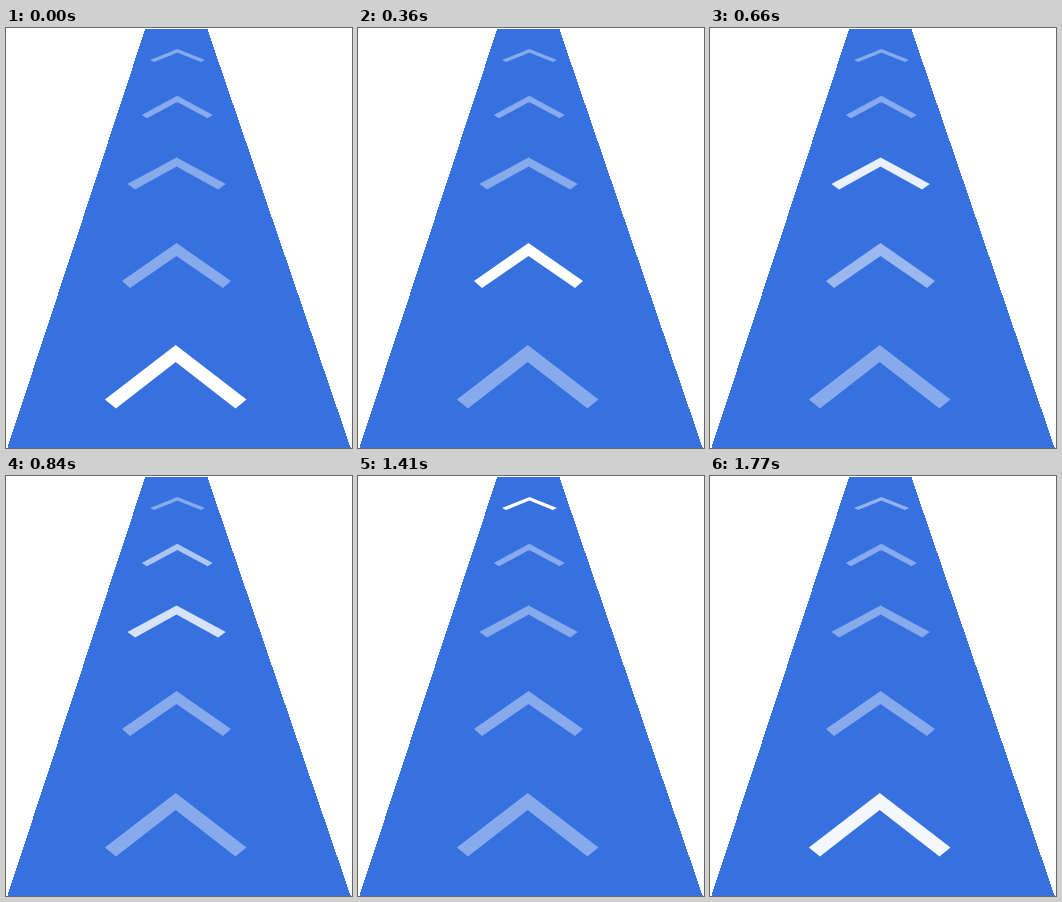
These frames come from a looping animation (346x420 px, 1860 ms). An HTML page with a canvas:

```html
<!DOCTYPE html>
<html lang="en">
<head>
<meta charset="utf-8">
<title>Road arrows</title>
<style>
  html, body { margin: 0; width: 100%; height: 100%; overflow: hidden; background: #fff; }
  canvas { display: block; }
</style>
</head>
<body>
<canvas id="stage" width="346" height="420"></canvas>
<script>
const ctx = document.getElementById('stage').getContext('2d');
const LOOP = 1860;
const DIM = 0.4;

// Each arrow, nearest first: centre, half widths of the tips, and heights.
const arrows = [
  { x: 169.7, outer: 70.8, inner: 59.8, top: 317, notch: 334, tip: 371.5, foot: 380.5 },
  { x: 170.5, outer: 54.5, inner: 46.5, top: 215, notch: 228, tip: 253, foot: 260 },
  { x: 170.6, outer: 49.2, inner: 41.5, top: 129.5, notch: 138.5, tip: 156, foot: 161.5 },
  { x: 171.3, outer: 35.5, inner: 30.3, top: 67.7, notch: 74, tip: 87, foot: 90.3 },
  { x: 171.5, outer: 27.5, inner: 23.3, top: 21, notch: 24.6, tip: 32, foot: 34 }
];

// The light passes from arrow i to the next between start and end.
const fades = [[0, 360], [360, 720], [720, 1080], [1080, 1410], [1470, 1800]];

// Motion advances in 60 ms steps, with two longer rests.
function stepTime(t) {
  const from = t < 1170 ? 0 : t < 1530 ? 1170 : 1530;
  const last = t < 1170 ? 1080 : t < 1530 ? 1410 : 1770;
  return Math.min(last, from + Math.floor((t - from) / 60) * 60);
}

function glow(t) {
  const levels = [0, 0, 0, 0, 0];
  let i = fades.findIndex(f => t < f[1]);
  if (i < 0) i = fades.length - 1;
  const [start, end] = fades[i];
  const k = Math.max(0, Math.min(1, (t - start) / (end - start)));
  levels[i] = 1 - k;
  levels[(i + 1) % levels.length] = k;
  return levels;
}

// Row by row, for crisp edges.
function drawRoad() {
  ctx.fillStyle = '#3771e0';
  for (let y = 1; y < 420; y++) {
    const k = (y - 1) / 418;
    const left = Math.round(139 - 137.5 * k);
    const right = Math.round(201.5 + 143 * k);
    ctx.fillRect(left, y, right - left, 1);
  }
}

function drawArrow(a, level) {
  ctx.fillStyle = `rgba(255,255,255,${DIM + (1 - DIM) * level})`;
  ctx.beginPath();
  ctx.moveTo(a.x, a.top);
  ctx.lineTo(a.x + a.outer, a.tip);
  ctx.lineTo(a.x + a.inner, a.foot);
  ctx.lineTo(a.x, a.notch);
  ctx.lineTo(a.x - a.inner, a.foot);
  ctx.lineTo(a.x - a.outer, a.tip);
  ctx.closePath();
  ctx.fill();
}

function draw(t) {
  ctx.clearRect(0, 0, 346, 420);
  drawRoad();
  const levels = glow(stepTime(t));
  arrows.forEach((a, i) => drawArrow(a, levels[i]));
}

const begin = performance.now();
function tick(now) {
  draw(Math.max(0, now - begin) % LOOP);
  requestAnimationFrame(tick);
}
draw(0);
requestAnimationFrame(tick);
</script>
</body>
</html>
```
